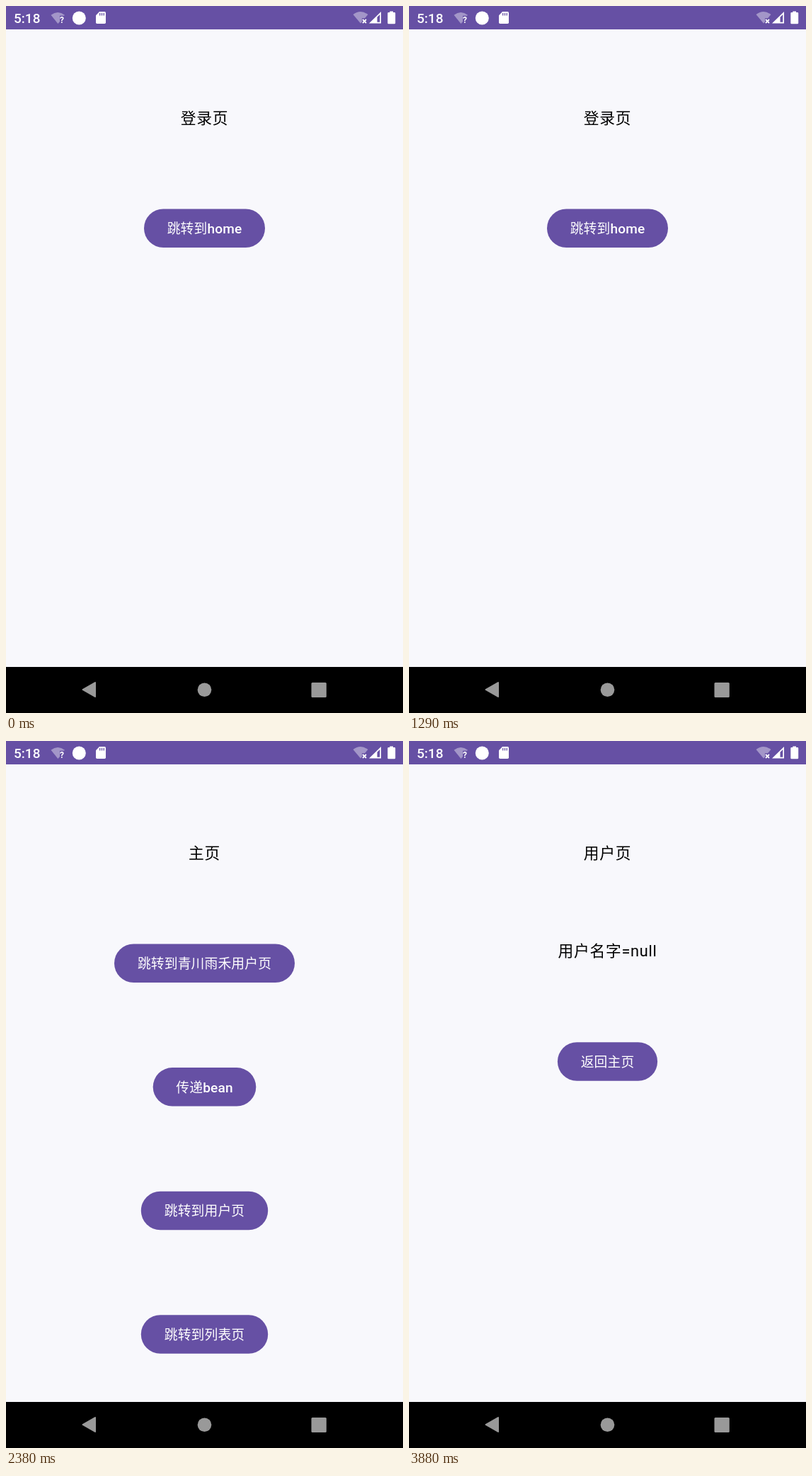
These frames come from a looping animation (561x998 px, 3920 ms). An HTML page:

```html
<!DOCTYPE html>
<html lang="zh-CN">
<head>
<meta charset="utf-8">
<title>Page navigation</title>
<style>
  html, body { margin: 0; width: 100%; height: 100%; overflow: hidden; background: #f8f8fc; }
  svg { display: block; width: 561px; height: 998px; }
  text { font-family: Roboto, "Noto Sans CJK SC", "Noto Sans CJK", sans-serif; }
  .title { font-size: 21.8px; letter-spacing: .68px; text-anchor: middle; fill: #000; }
  .label { font-size: 18.8px; letter-spacing: .13px; text-anchor: middle; fill: #fff; }
  .label .latin { font-size: 19.1px; font-weight: 500; }
  .clock { font-size: 19px; font-weight: 500; }
  .mark { font-size: 12px; font-weight: 700; }
</style>
</head>
<body>
<svg viewBox="0 0 561 998">
  <rect width="561" height="998" fill="#f8f8fc"/>
  <g id="pages"></g>

  <rect width="561" height="33" fill="#6650a4"/>
  <g fill="#fff">
    <text class="clock" x="11" y="24">5:18</text>
    <path d="M63.5 12.7Q73.2 5.3 83 12.7L82 13.8H76V22L73.4 25Z" opacity=".4"/>
    <text class="mark" x="76" y="24">?</text>
    <circle cx="103.3" cy="17" r="9.5"/>
    <path d="M132 8H139.3Q141 8 141 9.7V23.3Q141 25 139.3 25H128.7Q127 25 127 23.3V13.2Z"/>
    <path d="M132.7 10V13.5M135.5 10V13.5M138.3 10V13.5" stroke="#6650a4" stroke-width="1.3"/>
    <path d="M490.5 12Q501 4.2 511.5 12L507 17.2H503V22.5L501 24.5Z" opacity=".4"/>
    <path d="M504 19L509 24M509 19L504 24" stroke="#fff" stroke-width="1.8"/>
    <path d="M513 24.5L530 8V24.5ZM524.5 15.8V22.8H528.3V12.1Z" fill-rule="evenodd"/>
    <path d="M542.3 7.5H547V9H549Q550.2 9 550.2 10.2V24Q550.2 25.2 549 25.2H540.5Q539.3 25.2 539.3 24V10.2Q539.3 9 540.5 9H542.3Z"/>
  </g>

  <rect y="933" width="561" height="65" fill="#000"/>
  <g fill="#999">
    <path d="M108.5 965L126 955V975Z" stroke="#999" stroke-width="2" stroke-linejoin="round"/>
    <circle cx="280.5" cy="965.3" r="9.8"/>
    <rect x="431.5" y="955" width="21.3" height="21" rx="1.5"/>
  </g>
</svg>
<script>
  const LOOP = 3920, FADE = 300, CENTER = 280.5;
  const EASE = 'cubic-bezier(.4, 0, .2, 1)';

  // Button entries: [label, top, width]; title entries: [text, baseline]
  const pages = [
    { from: 0, to: 1320,
      titles: [['登录页', 165.5]],
      buttons: [['跳转到home', 286.5, 171]] },
    { from: 1320, to: 2480,
      titles: [['主页', 165.5]],
      buttons: [['跳转到青川雨禾用户页', 286.5, 255], ['传递bean', 461.1, 145.6],
                ['跳转到用户页', 635.7, 179.4], ['跳转到列表页', 810.3, 179.4]] },
    { from: 2480, to: LOOP,
      titles: [['用户页', 165.5], ['用户名字=null', 304.3]],
      buttons: [['返回主页', 425.2, 141.2]] }
  ];

  function add(parent, tag, attrs) {
    const el = document.createElementNS('http://www.w3.org/2000/svg', tag);
    for (const key in attrs) el.setAttribute(key, attrs[key]);
    return parent.appendChild(el);
  }

  function addText(parent, cls, text, y) {
    const el = add(parent, 'text', { class: cls, x: CENTER, y });
    for (const part of text.split(/([a-z=]+)/).filter(Boolean)) {
      const latin = /[a-z]/.test(part);
      add(el, 'tspan', latin ? { class: 'latin' } : {}).textContent = part;
    }
  }

  function addButton(parent, [label, y, width]) {
    add(parent, 'rect', { x: CENTER - width / 2, y, width, height: 54.5, rx: 27.25, fill: '#6650a4' });
    addText(parent, 'label', label, y + 34.6);
  }

  function fadeSteps({ from, to }) {
    const steps = [];
    const step = (time, opacity) => steps.push({ offset: time / LOOP, opacity, easing: EASE });
    step(0, from ? 0 : 1);
    if (from) { step(from, 0); step(from + FADE, 1); }
    if (to < LOOP) { step(to, 1); step(to + FADE, 0); }
    step(LOOP, to < LOOP ? 0 : 1);
    return steps;
  }

  const root = document.getElementById('pages');
  for (const page of pages) {
    const group = add(root, 'g', {});
    page.titles.forEach(([text, y]) => addText(group, 'title', text, y));
    page.buttons.forEach(button => addButton(group, button));
    const fade = group.animate(fadeSteps(page), { duration: LOOP, iterations: Infinity });
    fade.startTime = document.timeline.currentTime;
  }
</script>
</body>
</html>
```
